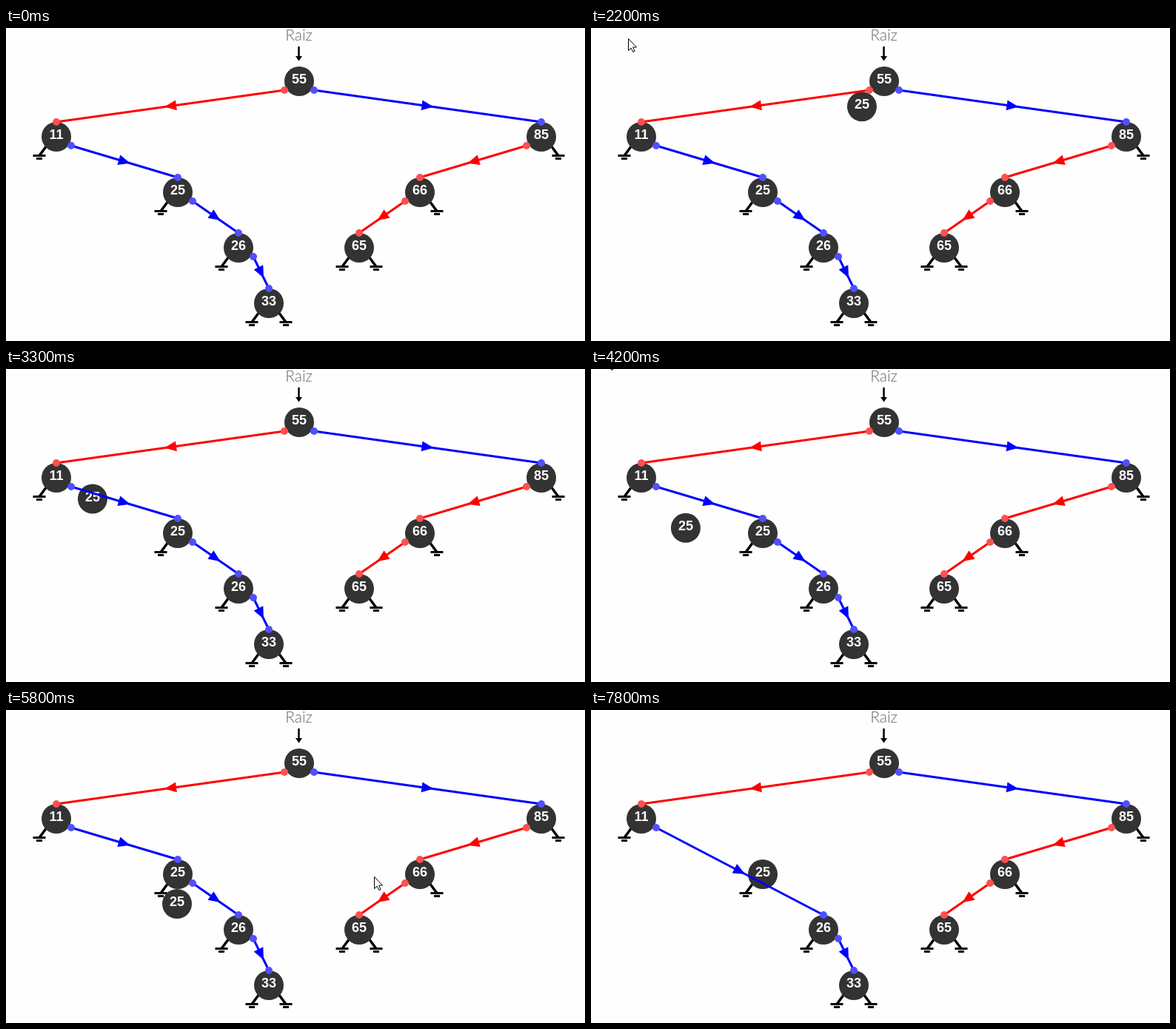
Recreate the animation shown at these times as an HTML page with a canvas. Size 782 by 423 pixels, loop 8 s.

```html
<!DOCTYPE html>
<html lang="pt">
<head>
<meta charset="utf-8">
<style>
  html, body { margin: 0; width: 100%; height: 100%; overflow: hidden; background: #fefefe; }
  canvas { display: block; }
</style>
</head>
<body>
<canvas id="stage" width="782" height="423"></canvas>
<script>
const ctx = document.getElementById('stage').getContext('2d');
const LOOP = 8000, STEP = 100;
const RED = '#ff0000', BLUE = '#0000ff', DARK = '#333333';

// grounds: sides without a child (-1 left, 1 right)
const nodes = {
  55: { x: 396, y: 72, grounds: [] },
  11: { x: 68, y: 147, grounds: [-1] },
  85: { x: 723, y: 147, grounds: [1] },
  25: { x: 232, y: 222, grounds: [-1] },
  66: { x: 559, y: 222, grounds: [1] },
  26: { x: 314, y: 297, grounds: [-1] },
  65: { x: 477, y: 297, grounds: [-1, 1] },
  33: { x: 355, y: 372, grounds: [-1, 1] }
};
const fixedEdges = [[55, 11, -1], [55, 85, 1], [85, 66, -1], [66, 65, -1], [26, 33, 1]];
const edgesBefore = [[11, 25, 1], [25, 26, 1]];
const edgesAfter = [[11, 26, 1]];

// The searching node descends in three eased moves.
const moves = [
  { start: 1345, from: [-145, 5], to: [395, 112] },
  { start: 2640, from: [395, 112], to: [67, 187] },
  { start: 3920, from: [67, 187], to: [231, 262] }
];
const MOVE_TIME = 1200;
const stalls = [2500, 3600, 4700];

// [from ms, to ms, tip x, tip y]
const pointer = [
  [200, 300, 144, -18], [2100, 2600, 50, 14], [2600, 2700, 34, -2],
  [4200, 4800, 21, -17], [5800, 5900, 497, 225], [5900, 6000, 350, 100],
  [6000, 6200, 246, 15]
];

const clamp = v => Math.max(0, Math.min(1, v));
const mix = (a, b, k) => a + (b - a) * k;
const progress = (t, from, to) => clamp((t - from) / (to - from));

// cubic-bezier(.25, .1, .25, 1)
function ease(p) {
  if (p <= 0 || p >= 1) return clamp(p);
  let low = 0, high = 1, u;
  for (let i = 0; i < 30; i++) {
    u = (low + high) / 2;
    if (0.75 * u * (1 - u) + u ** 3 < p) low = u; else high = u;
  }
  return 0.3 * u * (1 - u) ** 2 + 3 * u * u * (1 - u) + u ** 3;
}

function line(x1, y1, x2, y2, color, width) {
  ctx.strokeStyle = color;
  ctx.lineWidth = width;
  ctx.beginPath();
  ctx.moveTo(x1, y1);
  ctx.lineTo(x2, y2);
  ctx.stroke();
}

function polygon(points, fill) {
  ctx.fillStyle = fill;
  ctx.beginPath();
  points.forEach(([x, y]) => ctx.lineTo(x, y));
  ctx.closePath();
  ctx.fill();
}

function disc(x, y, radius, color) {
  ctx.fillStyle = color;
  ctx.beginPath();
  ctx.arc(x, y, radius, 0, 2 * Math.PI);
  ctx.fill();
}

function text(label, x, y, font, color) {
  ctx.font = font;
  ctx.fillStyle = color;
  ctx.textAlign = 'center';
  ctx.fillText(label, x, y);
}

function ground(x, y, side) {
  const cx = x + side * 23;
  line(x + side * 13, y + 12, cx, y + 25.5, '#000', 3.5);
  line(cx - 8.5, y + 25.5, cx + 8.5, y + 25.5, '#000', 3);
  line(cx - 4, y + 29.5, cx + 4, y + 29.5, '#000', 3);
}

function drawNode(label, x, y, grounds = [], alpha = 1) {
  ctx.globalAlpha = alpha;
  grounds.forEach(side => ground(x, y, side));
  disc(x, y, 20, DARK);
  text(label, x, y + 3, 'bold 18px "Liberation Sans", Arial, sans-serif', '#fff');
  ctx.globalAlpha = 1;
}

function drawEdge([parent, child, side]) {
  const color = side < 0 ? RED : BLUE;
  const dot = side < 0 ? '#ff5050' : '#5050ff';
  const x1 = nodes[parent].x + side * 20, y1 = nodes[parent].y + 12;
  const x2 = nodes[child].x, y2 = nodes[child].y - 20;
  line(x1, y1, x2, y2, color, 3);
  ctx.save();
  ctx.translate((x1 + x2) / 2, (y1 + y2) / 2);
  ctx.rotate(Math.atan2(y2 - y1, x2 - x1));
  polygon([[8, 0], [-8, -7], [-8, 7]], color);
  ctx.restore();
  disc(x1, y1, 5, dot);
  disc(x2, y2, 5, dot);
}

function drawSeeker(t) {
  const move = moves.filter(m => t >= m.start).pop();
  if (!move) return;
  const k = ease((t - move.start) / MOVE_TIME);
  const x = mix(move.from[0], move.to[0], k);
  const y = mix(move.from[1], move.to[1], k) - 40 * ease(progress(t, 6500, 7000));
  drawNode(25, x, y, [], 1 - progress(t, 6940, 7340));
}

function drawPointer(t) {
  const spot = pointer.find(([from, to]) => t >= from && t < to);
  if (!spot) return;
  ctx.save();
  ctx.translate(spot[2] + 0.5, spot[3] + 0.5);
  polygon([[0, 0], [0, 16], [3.6, 12.6], [6.3, 18], [8.6, 17], [6.2, 11.5], [11, 11.5]], '#fff');
  ctx.strokeStyle = '#000';
  ctx.lineWidth = 1;
  ctx.stroke();
  ctx.restore();
}

function drawClick(t) {
  // lower part of a hand pointer resting on the top edge
  if (t < 5400 || t >= 5500) return;
  polygon([[221.5, 0], [222, 3], [226.5, 9], [226.5, 12.5], [235, 12.5], [235, 9], [237.5, 4], [237.5, 0]], '#fff');
  ctx.strokeStyle = '#000';
  ctx.lineWidth = 1;
  ctx.stroke();
}

function render(t) {
  ctx.fillStyle = '#fefefe';
  ctx.fillRect(0, 0, 782, 423);

  text('Raiz', 395.5, 17, '300 21px Lato, sans-serif', '#666');
  line(395.5, 25, 395.5, 40, '#000', 2.5);
  polygon([[391, 38], [400, 38], [395.5, 44.5]], '#000');

  const fade = t < 7500 ? 1 - progress(t, 6500, 7120) : progress(t, 7500, 7800);
  for (const [label, { x, y, grounds }] of Object.entries(nodes)) {
    drawNode(label, x, y, grounds, label === '25' ? fade : 1);
  }
  drawSeeker(t);
  [...fixedEdges, ...(t < 7300 ? edgesBefore : edgesAfter)].forEach(drawEdge);
  drawPointer(t);
  drawClick(t);
}

const origin = performance.now();
function tick() {
  let t = Math.floor(((performance.now() - origin) % LOOP) / STEP) * STEP;
  if (stalls.includes(t)) t -= STEP;
  render(t);
  requestAnimationFrame(tick);
}
tick();
</script>
</body>
</html>
```
